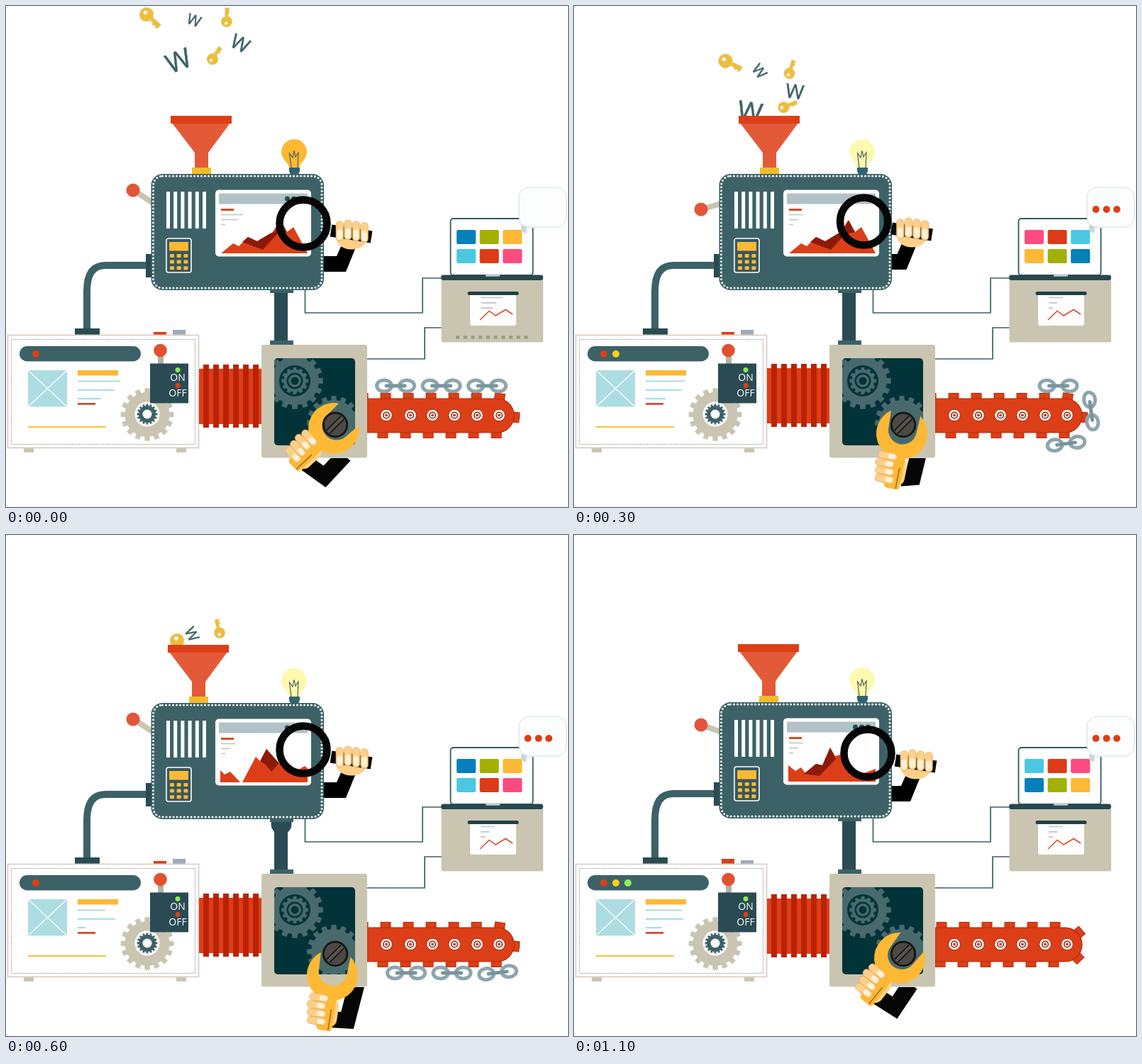
Write an HTML page that moves like this. It is 792 px wide and 707 px high and loops after 1200 ms.

```html
<!DOCTYPE html>
<html lang="en">
<head>
<meta charset="utf-8">
<title>Keyword machine</title>
<style>
html, body { margin: 0; width: 100%; height: 100%; overflow: hidden; background: #fff; }
svg { display: block; width: 792px; height: 707px; }
text { font-family: "Open Sans", "Noto Sans", sans-serif; text-anchor: middle; }
.teal { fill: #3c6267; }
.dark { fill: #2a4b54; }
.tan { fill: #c9c5b1; }
.red { fill: #dc3f17; }
.gold { fill: #fdb934; }
.gear { fill: #486a6d; }
.deep { fill: #013338; }
.skin { fill: #fdd08a; }
.nail { fill: #fff1d6; }
.line { fill: none; stroke: #3c6267; stroke-width: 1.7; }
.grey { fill: none; stroke: #c0c3c3; stroke-width: 1.7; }
.sky { fill: none; stroke: #a9dde4; stroke-width: 2.2; }
</style>
</head>
<body>
<svg viewBox="0 0 792 707">
  <defs>
    <clipPath id="aboveRim"><rect width="792" height="157"/></clipPath>
    <clipPath id="window"><rect x="378" y="497" width="114" height="123" rx="5"/></clipPath>
    <clipPath id="sleeveSide"><rect x="448" y="240" width="200" height="200"/></clipPath>
    <clipPath id="belowFrame"><rect x="360" y="638" width="200" height="69"/></clipPath>
    <clipPath id="barSide"><rect x="509" y="500" width="283" height="207"/></clipPath>
    <clipPath id="tube"><rect x="365" y="405" width="50" height="68"/></clipPath>
    <clipPath id="plot"><rect x="302" y="285" width="123" height="64"/></clipPath>
  </defs>

  <g id="falling" clip-path="url(#aboveRim)"></g>

  <!-- wires -->
  <path class="line" d="M421.5 400V433H587V384H615M509 498H590V454H615"/>

  <!-- vertical tube -->
  <rect class="dark" x="378" y="402" width="19" height="73"/>
  <g clip-path="url(#tube)"><circle id="ball" class="dark" cx="388" r="14.5"/></g>
  <rect class="teal" x="372" y="472" width="33" height="6"/>

  <!-- upper machine -->
  <g id="rig">
    <path d="M200 366H140C122 366 114 379 114 403V457" fill="none" stroke="#3c6267" stroke-width="10"/>
    <rect class="dark" x="197" y="350" width="10" height="33"/>
    <path id="lever" stroke="#c9c5b1" stroke-width="8"/>
    <circle id="knob" cx="179" r="9.5" fill="#e2553a"/>
    <g id="funnel">
      <path d="M234 165H316L285 207V229H266V207Z" fill="#e35a38"/>
      <rect class="red" x="232" y="155" width="86" height="11"/>
      <rect x="262" y="228" width="27" height="10" fill="#f0bc2e"/>
    </g>
    <path id="bulb" d="M399 229C399 221 388 217 388 206A18 18 0 0 1 424 206C424 217 413.500 221 413.500 229Z"/>
    <path d="M402 228L399.500 208L404 214L406 204L408 213L412 207L411 228" fill="none" stroke="#3b565a" stroke-width="1.1"/>
    <path d="M399 228H414V233L412 238H401L399 233Z" fill="#2f6570"/>
    <rect class="teal" x="372" y="400" width="33" height="5"/>
    <rect class="teal" x="204.500" y="237" width="243.500" height="164" rx="16"/>
    <rect x="207.500" y="240" width="237.500" height="158" rx="13" fill="none" stroke="#fff" stroke-width="3" stroke-linecap="round" stroke-dasharray="0 5"/>
    <g id="vents" fill="#fff"></g>
    <rect x="226" y="328" width="35" height="48" rx="3" fill="#38575d" stroke="#fff" stroke-width="1.6"/>
    <rect class="gold" x="230" y="333" width="27" height="12.500"/>
    <g id="pad" class="gold"></g>
    <rect x="295" y="259.500" width="135" height="94" rx="5" fill="#fff"/>
    <rect x="300" y="264.500" width="125" height="15" fill="#b2c2c7"/>
    <g fill="#1f4c54"><circle cx="396.500" cy="272" r="3.600"/><circle cx="405.500" cy="272" r="3.600"/><circle cx="414.500" cy="272" r="3.600"/></g>
    <path d="M303 287.500H321" stroke="#dc3f17" stroke-width="2.800"/>
    <path id="notes" class="grey"/>
    <g clip-path="url(#plot)">
      <path id="hill" class="red"/>
      <path id="shade" fill="#8c1a06"/>
    </g>
  </g>

  <!-- magnifier -->
  <g clip-path="url(#sleeveSide)"><path id="sleeve" d="M54 30L73 36L60 68H10V46H47Z"/></g>
  <g id="lens">
    <circle r="33.500" fill="none" stroke="#060606" stroke-width="10.500"/>
    <ellipse class="skin" cx="68" cy="22" rx="21" ry="14.500"/>
    <path d="M39 10L96 19" stroke="#060606" stroke-width="17"/>
    <g id="grip"></g>
  </g>

  <!-- left box -->
  <rect class="tan" x="25" y="624" width="14" height="6"/>
  <rect class="tan" x="240" y="624" width="14" height="6"/>
  <rect id="redKey" class="red" x="208" width="18" height="8"/>
  <rect id="greyKey" x="235" width="18" height="8" fill="#9faabb"/>
  <rect class="dark" x="97" y="455" width="35" height="9"/>
  <rect x="2.500" y="464.500" width="269" height="159" fill="#fff" stroke="#dccfc2" stroke-width="1.800"/>
  <rect x="7.500" y="470.500" width="259" height="148" fill="none" stroke="#666" stroke-dasharray="1 1.600"/>
  <rect class="teal" x="19" y="480" width="171" height="21.500" rx="10.700"/>
  <g id="leds"></g>
  <rect x="31" y="514" width="55" height="51.500" fill="#acdde2"/>
  <path d="M31 514L86 565.500M86 514L31 565.500" stroke="#fff" stroke-width="1.300"/>
  <rect class="gold" x="101" y="514" width="57" height="7.500"/>
  <path id="copy" class="sky"/>
  <path d="M101 561.500H126" stroke="#c8321c" stroke-width="2.400"/>
  <path d="M31 594H141" stroke="#f8c136" stroke-width="2.200"/>
  <path id="bigCog" class="tan"/>
  <circle cx="199" cy="576" r="17.500" fill="#fff"/>
  <path id="smallCog" class="teal"/>
  <circle cx="199" cy="576" r="6.500" fill="#fff"/>
  <rect x="214" y="492" width="8" height="14" fill="#b5b1a5"/>
  <circle cx="217.500" cy="486" r="9.300" fill="#e2512f"/>
  <rect class="dark" x="203" y="504.500" width="54" height="56"/>
  <circle cx="242" cy="513.500" r="3.500" fill="#86f04c"/>
  <circle class="red" cx="242" cy="535.500" r="3.500"/>
  <g fill="#fff" font-size="14"><text x="242" y="529">ON</text><text x="242" y="551">OFF</text></g>

  <g id="bellows"></g>

  <!-- frame with gears -->
  <rect class="tan" x="360" y="478" width="149" height="159.500" rx="3"/>
  <rect class="deep" x="378" y="497" width="114" height="123" rx="5"/>
  <g clip-path="url(#window)">
    <path id="cogA" class="gear"/>
    <circle class="deep" cx="407" cy="529" r="22"/>
    <path id="cogB" class="gear"/>
    <circle class="deep" cx="407" cy="529" r="11.500"/>
    <circle class="gear" cx="407" cy="529" r="9"/>
    <circle class="deep" cx="407" cy="529" r="5.500"/>
    <path id="cogC" class="gear"/>
  </g>

  <!-- chain bar -->
  <g clip-path="url(#barSide)">
    <g id="teeth" class="red" stroke="#b52b0b"></g>
    <path class="red" d="M509 554H692A24 24 0 0 1 692 602H509Z" stroke="#b52b0b" stroke-width="1.200"/>
    <path class="red" d="M512 556H691V600H512Z"/>
    <g id="screws"></g>
    <g id="chain" fill="none" stroke="#8da6ad" stroke-width="5"></g>
  </g>

  <!-- wrench -->
  <g clip-path="url(#belowFrame)"><path id="arm" fill="none" stroke="#060606" stroke-width="23"/></g>
  <g id="wrench">
    <rect class="skin" x="-22" y="32" width="38" height="42" rx="12"/>
    <path class="gold" d="M-21 -29.200A36 36 0 1 0 21 -29.200L20 -5A20 20 0 0 1 -20 -5Z"/>
    <path class="gold" d="M-11 28H11V74Q11 79 6 79H-5Q-11 79 -11 74Z"/>
    <path d="M6 48V78" stroke="#9a6420" stroke-width="1.400"/>
    <g id="fist"></g>
  </g>
  <circle cx="464" cy="591" r="16.800" fill="#4c4843" stroke="#151515" stroke-width="2.800"/>
  <path d="M454 601L474 581" stroke="#151515" stroke-width="8"/>
  <path d="M454 601L474 581" stroke="#5a554f" stroke-width="4.500"/>

  <!-- laptop and printer -->
  <rect x="626.500" y="300" width="116" height="80" rx="4" fill="#fff" stroke="#36585f" stroke-width="1.800"/>
  <g id="tiles"></g>
  <rect class="tan" x="613.500" y="385" width="143.500" height="89.500" rx="2"/>
  <rect x="613" y="379.500" width="144" height="7.500" rx="3.500" fill="#27484f"/>
  <path d="M676 380.500H696" stroke="#e6eded" stroke-width="2"/>
  <rect x="654" y="405" width="65" height="46" rx="3" fill="#fff"/>
  <rect x="650.500" y="403" width="72" height="5" rx="2.500" fill="#1d4047"/>
  <path id="print" class="grey"/>
  <path d="M668 443L681 430.500L690 437L704 428.500L714 435" fill="none" stroke="#dc4a2c" stroke-width="1.500"/>
  <path id="feed" d="M634 467.500H737" stroke="#99958a" stroke-width="4" stroke-dasharray="5 5.700"/>
  <path d="M726 309V316L731 321L736 316L746 312Z" fill="#ccd5d7"/>
  <path d="M734 309L733 320L744 311Z" fill="#f4f7f7"/>
  <rect x="723" y="256" width="66.500" height="56" rx="14" fill="#fcfefe" stroke="#d3dfe1"/>
  <g id="dots" class="red"><circle cx="735.500" cy="287" r="5"/><circle cx="750.500" cy="287" r="5"/><circle cx="765" cy="287" r="5"/></g>
</svg>
<script>
const STEP = 100, STEPS = 12;
const $ = id => document.getElementById(id);
const set = (id, attrs) => { for (const a in attrs) $(id).setAttribute(a, attrs[a]); };
const show = (el, on) => el.setAttribute('visibility', on ? 'visible' : 'hidden');
const repeat = (n, f) => Array.from({ length: n }, (_, i) => f(i)).join('');
const rect = (x, y, w, h, more = '') => `<rect x="${x}" y="${y}" width="${w}" height="${h}" ${more}/>`;
const lines = (x, y, gap, ends) => ends.map((e, i) => `M${x} ${y + i * gap}H${e}`).join('');

// Keyed poses, linear in between; null once a part has left the scene.
const KEYS = [0, 2, 4, 6, 7, 9, 11];
function at(k, rows) {
  const i = KEYS.filter(t => t <= k).length - 1;
  const a = rows[i], b = rows[i + 1];
  if (a && KEYS[i] === k) return a;
  if (!a || !b) return null;
  const f = (k - KEYS[i]) / (KEYS[i + 1] - KEYS[i]);
  return a.map((v, j) => v + (b[j] - v) * f);
}

function cog(cx, cy, r, h, n) {
  const pts = [];
  for (let i = 0; i < n; i++) {
    for (const [f, d] of [[-.3, h], [-.24, 0], [.24, 0], [.3, h]]) {
      const a = (i + f) * 2 * Math.PI / n;
      pts.push((cx + (r - d) * Math.sin(a)).toFixed(1) + ' ' + (cy - (r - d) * Math.cos(a)).toFixed(1));
    }
  }
  return 'M' + pts.join('L') + 'Z';
}

// Along the top edge, around the tip, back along the bottom.
function onBar(s, cx, cy, r, arc) {
  let x = s, y = cy - r, deg = 0;
  if (s > cx + arc) { x = 2 * cx + arc - s; y = cy + r; deg = 180; }
  else if (s > cx) {
    deg = (s - cx) / arc * 180;
    const a = deg * Math.PI / 180;
    x = cx + r * Math.sin(a);
    y = cy - r * Math.cos(a);
  }
  return `translate(${x} ${y}) rotate(${deg})`;
}

const keyArt = size => `<g transform="scale(${size})" fill="#efbd36" stroke="#dcd8cc" stroke-width=".7">
  <path d="M7 -3H25V3L22 6L20 3L17 6L14 3H7Z"/><circle r="10"/><circle cx="-3" cy="-1" r="2.800" fill="#fff"/></g>`;
const wArt = size => `<text y="${size * .36}" font-size="${size}" fill="#3c6267" stroke="#3c6267" stroke-width=".5">W</text>`;

const ITEMS = [
  [keyArt(1), [[198, 12, 42], [214, 52, 28], [213, 103, 24], [241, 149, 50], [241, 159, 50]]],
  [wArt(21), [[265, 20, 20], [263, 66, 50], [260, 118, 54], [262, 140, 62], [262, 148, 62]]],
  [keyArt(.78), [[311, 22, -90], [307, 72, -72], [300, 118, -74], [301, 138, -105], [301, 148, -105]]],
  [wArt(28), [[330, 53, 27], [320, 98, 7], [302, 143, 7], [290, 180, 7]]],
  [wArt(38), [[243, 77, -22], [246, 123, 9], [250, 175, 9]]],
  [keyArt(.8), [[291, 75, -58], [295, 116, -26], [296, 170, -20]]]
];

const FUNNEL = [[0], [0], [0], [-4], [-3], [-5], [-1]];
const LENS = [[419, 307], [411, 293], [406, 315], [419, 303], [419, 297], [402, 308], [414, 308]];
// head x, head y, turn, elbow x, elbow y, shoulder x
const WRENCH = [
  [462, 596, 47, 449, 664, 477], [462, 598, 14, 473, 660, 480], [462, 609, 8, 482, 670, 490],
  [460, 621, 9, 481, 685, 494], [455, 616, 18, 464, 683, 485], [453, 607, 34, 449, 675, 474],
  [459, 597, 38, 452, 667, 474]
];
const COPY = [
  [161, 153, 134], [161, 148, 134], [152, 154, 124], [140, 154, 112],
  [140, 154, 124], [161, 148, 134], [152, 154, 124]
];
const CHAIN = [[549], [591], [774], [812], [851], [966], [1030]];
const KNOB = [260, 269, 274, 287, 277, 269];
const BALL = { 6: 408, 7: 433, 8: 455, 9: 475 };

const PEAK = {
  hill: 'M-66 48V30L-59 37L-51 33L-37 48H-34L-15 12L-8 19L0 1L17 21L32 26L40 33L54 25L62 32L68 35L75 30L87 40V48Z',
  shade: 'M0 1L-9 18L-1 23L7 33L18 21Z'
};
const RISE = {
  hill: 'M303 349L320 335L328 339L341 326L354 332L375 320L386 303L396 319L405 312L425 349Z',
  shade: 'M333 333L341 326L354 332L372 321L378 319L387 302L396 319L382 322L362 344Z'
};
const SLOPE = {
  hill: 'M302 349V326L312 334L320 329L326 337L341 324L350 326L361 301L368 313L378 310L394 333L406 338L425 331V349Z',
  shade: 'M324 338L341 324L350 326L361 301L369 317L346 341Z'
};
const CHARTS = [[RISE, 0, 0], [RISE, 0, 0], [PEAK, 339, 301], [PEAK, 367, 301], [SLOPE, 0, 0], [SLOPE, 0, 0]];

const [BLUE, LIME, AMBER, CYAN, RED, PINK] = ['#0580ba', '#a1b003', '#fdb934', '#4ac8e2', '#dc3b17', '#fd4a80'];
const TILES = [
  [BLUE, LIME, AMBER, CYAN, RED, PINK],
  [PINK, RED, CYAN, AMBER, LIME, BLUE],
  [CYAN, RED, PINK, BLUE, LIME, AMBER]
];

function build() {
  $('falling').innerHTML = ITEMS.map(([art]) => `<g>${art}</g>`).join('');
  $('vents').innerHTML = repeat(6, i => rect(226 + i * 10.2, 262, 5, 52));
  $('pad').innerHTML = repeat(9, i => rect(231 + i % 3 * 9.7, 350 + Math.floor(i / 3) * 8.6, 6, 5, 'rx="1"'));
  $('leds').innerHTML = ['#dc3f17', '#fbcf1d', '#8df25c']
    .map((c, i) => `<circle cx="${42 + i * 17}" cy="491" r="5" fill="${c}"/>`).join('');
  $('bellows').innerHTML = rect(272, 512, 88, 78, 'fill="#e03c17"') +
    repeat(6, i => rect(278 + i * 14, 506, 8, 89, 'fill="#b92305"'));
  $('screws').innerHTML = [536, 570, 601, 632, 664, 695].map(x =>
    `<circle cx="${x}" cy="577.500" r="8.300" fill="#fff" stroke="#a32508"/>
     <circle cx="${x}" cy="577.500" r="4.300" fill="#fff" stroke="#8a2410" stroke-width="1.600"/>
     <circle cx="${x}" cy="577.500" r="2" fill="#c33a1c"/>`).join('');
  $('teeth').innerHTML = repeat(15, () => rect(-7, -4, 14, 12));
  $('chain').innerHTML = repeat(3, () =>
    `<g><ellipse cx="-16" rx="10.500" ry="8"/><ellipse cx="16" rx="10.500" ry="8"/>
     <path d="M-13 0H13" stroke="#78949c" stroke-linecap="round"/></g>`);
  $('tiles').innerHTML = repeat(6, i => rect(635 + i % 3 * 32.6, 316 + (i > 2 ? 27 : 0), 27, 20, 'rx="2"'));
  const edge = 'class="skin" stroke="#e3a95c" stroke-width=".7"';
  $('grip').innerHTML = repeat(4, i => {
    const x = 46 + i * 11.6, y = -5 + Math.abs(i - 1) * 1.8;
    return rect(x, y, 10.5, 28, `rx="5" ${edge}`) + rect(x + 1.5, y + 12, 7.5, 14, 'rx="3.500" class="nail"');
  });
  $('fist').innerHTML = repeat(4, i => {
    const x = -29 + Math.abs(i - 1) * 1.8, y = 29 + i * 11;
    return rect(x, y, 27, 10.5, `rx="5" ${edge}`) + rect(x + 14, y + 1.7, 11, 7, 'rx="3.500" class="nail"');
  });
  set('bigCog', { d: cog(199, 576.5, 37.5, 6, 16) });
  set('smallCog', { d: cog(199, 576, 14.5, 2.5, 16) });
  set('cogA', { d: cog(407, 529, 40, 6, 16) });
  set('cogB', { d: cog(407, 529, 19, 3, 12) });
  set('cogC', { d: cog(462, 588, 38, 6, 16) });
}

function draw(k) {
  const lit = k % 4 > 1, pair = Math.floor(k / 2), late = k > 6;

  ITEMS.forEach(([, poses], i) => {
    const el = $('falling').children[i], p = at(k, poses);
    show(el, p);
    if (p) el.setAttribute('transform', `translate(${p[0]} ${p[1]}) rotate(${p[2]})`);
  });

  set('rig', { transform: `translate(0 ${late ? -1 : 0})` });
  set('funnel', { transform: `translate(${at(k, FUNNEL)[0]} 0)` });
  set('bulb', { fill: lit ? '#fdf9ae' : '#fdb934' });
  const ky = KNOB[k % 6];
  set('knob', { cy: ky });
  set('lever', { d: `M180 ${ky}L210 ${ky > 280 ? 278 : 280}` });
  set('notes', { d: lines(303, 294.5, 7, lit ? [323, 316, 309] : [334, 327, 309]) });
  const [shape, cx, cy] = CHARTS[pair];
  for (const id of ['hill', 'shade']) set(id, { d: shape[id], transform: `translate(${cx} ${cy})` });

  const lens = `translate(${at(k, LENS).join(' ')})`;
  set('lens', { transform: lens });
  set('sleeve', { transform: lens });
  show($('ball'), BALL[k]);
  if (BALL[k]) set('ball', { cy: BALL[k] });

  set('redKey', { y: late ? 457 : 460 });
  set('greyKey', { y: late ? 459 : 457 });
  [...$('leds').children].forEach((el, i) => show(el, i <= pair % 3));
  set('copy', { d: lines(101, 529.5, 12.3, at(k, COPY)) });
  set('bellows', { transform: `translate(0 ${late ? 1 : k % 6 > 1 ? -1 : 0})` });

  const shift = [0, 18, 15][k % 3];
  [...$('teeth').children].forEach((el, i) =>
    el.setAttribute('transform', onBar(503 + shift + i * 32, 692, 578, 27.5, 66)));
  const s = at(k, CHAIN)[0];
  [...$('chain').children].forEach((el, i) =>
    el.setAttribute('transform', onBar(s + i * 64.5, 688, 577, 41, 129)));

  const [x, y, deg, ex, ey, sx] = at(k, WRENCH);
  const a = deg * Math.PI / 180, sin = Math.sin(a), cos = Math.cos(a);
  set('wrench', { transform: `translate(${x} ${y}) rotate(${deg})` });
  set('arm', { d: `M${x + 10 * cos - 62 * sin} ${y + 10 * sin + 62 * cos}L${ex} ${ey}L${sx} 634` });

  [...$('tiles').children].forEach((el, i) => el.setAttribute('fill', TILES[pair % 3][i]));
  set('print', { d: lines(669, 411.5, 7.3, lit ? [689, 681, 675] : [700, 691, 686]) });
  show($('feed'), !lit);
  show($('dots'), lit);
}

build();
const start = performance.now();
let last = -1;
function tick() {
  const k = Math.floor((performance.now() - start) / STEP) % STEPS;
  if (k !== last) draw(last = k);
  requestAnimationFrame(tick);
}
tick();
</script>
</body>
</html>
```
